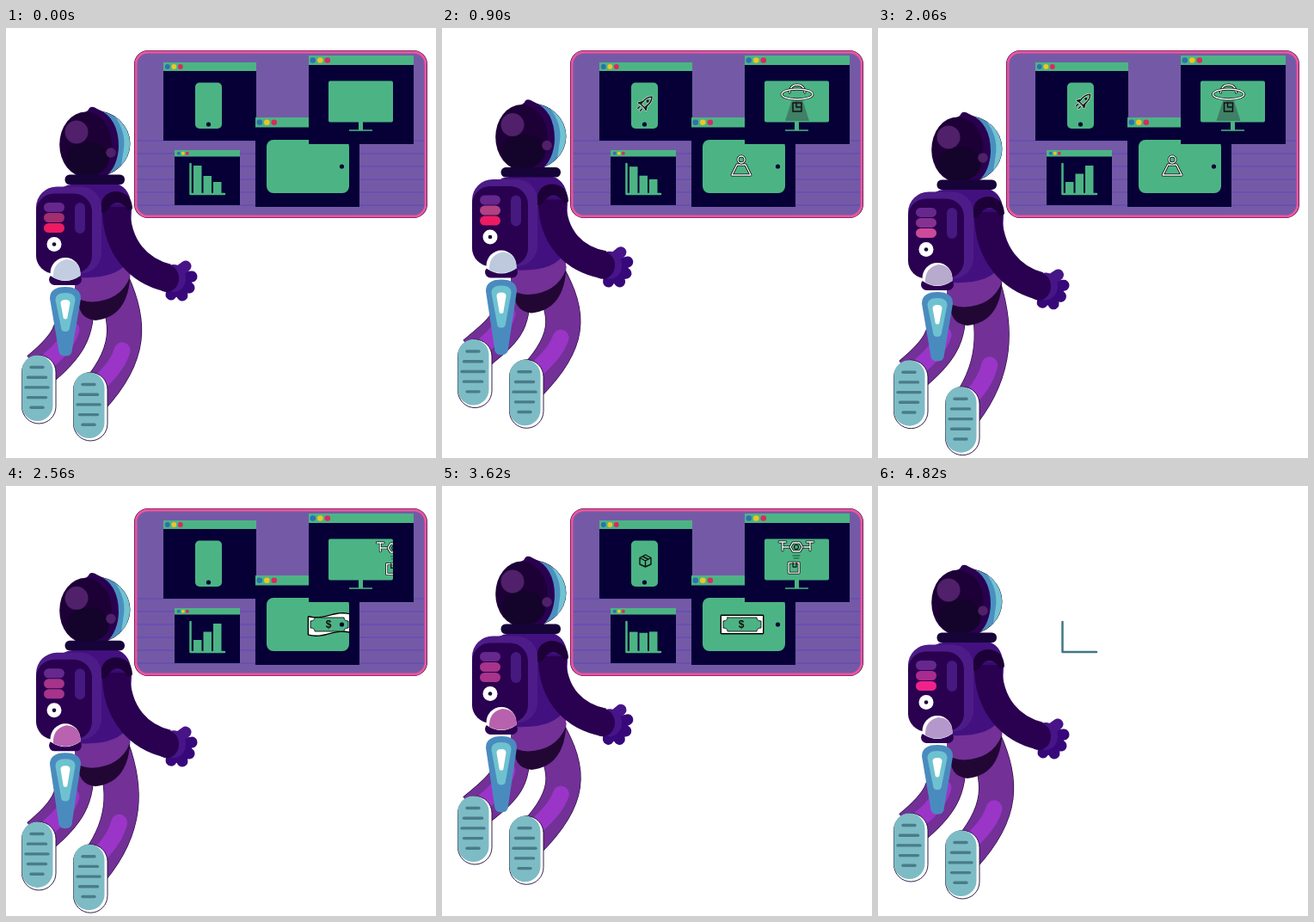
These frames come from a looping animation (500 by 500 pixels, 4.84 s). An HTML page with a canvas:

```html
<!DOCTYPE html>
<html>
<head>
<meta charset="utf-8">
<style>
  html, body { margin: 0; width: 100%; height: 100%; overflow: hidden; background: #fff; }
  canvas { display: block; }
</style>
</head>
<body>
<canvas id="stage" width="500" height="500"></canvas>
<script>
const ctx = document.getElementById('stage').getContext('2d');
const LOOP = 4840;
const GREEN = '#4cb484', NAVY = '#060036', DARK = '#2a0050', PURPLE = '#733097', EDGE = '#1d0733';
let t = 0;

// Motion helpers
const ease = p => (1 - Math.cos(Math.PI * Math.min(1, Math.max(0, p)))) / 2;
function key(times, values) {
  let i = 0;
  while (i < times.length - 2 && t > times[i + 1]) i++;
  const p = ease((t - times[i]) / (times[i + 1] - times[i]));
  return values[i] + (values[i + 1] - values[i]) * p;
}
const tint = (times, colors) =>
  `rgb(${[0, 1, 2].map(c => Math.round(key(times, colors.map(v => v[c])))).join()})`;
const slide = (start, end, width, inTime = 600) =>
  width * (1 - ease((t - start) / inTime) - ease((t - end) / 350));

// Drawing helpers
const shape = path => typeof path === 'string' ? new Path2D(path) : path;
function fill(path, color) {
  ctx.fillStyle = color;
  ctx.fill(shape(path));
}
function line(path, color, width) {
  ctx.strokeStyle = color;
  ctx.lineWidth = width;
  ctx.stroke(shape(path));
}
function box(x, y, w, h, r = 0) {
  const p = new Path2D();
  p.roundRect(x, y, w, h, r);
  return p;
}
function oval(x, y, rx, ry = rx) {
  const p = new Path2D();
  p.ellipse(x, y, rx, ry, 0, 0, 7);
  return p;
}
function at(x, y, draw, angle = 0) {
  ctx.save();
  ctx.translate(x, y);
  ctx.rotate(angle);
  draw();
  ctx.restore();
}
function inside(path, draw) {
  ctx.save();
  ctx.clip(path);
  draw();
  ctx.restore();
}
function outlined(path) {
  line(path, '#000', 2.8);
  line(path, '#fff', 1.4);
}

// Screen contents
function rocket() {
  const body = 'M0 -10 Q5 -5 3 5 H-3 Q-5 -5 0 -10Z M-3 1 L-6 6 L-3 5 M3 1 L6 6 L3 5 M-2 8 V11 M2 8 V11';
  line(body, '#fff', 2.4);
  line(body, '#111', 1.5);
  fill(oval(0, -3, 1.5), '#111');
}
function ufo() {
  fill('M-6 7 H6 L14 32 H-14Z', '#3f8066');
  outlined('M-9 -1 Q-8 -10 0 -10 Q8 -10 9 -1');
  outlined(oval(0, 1, 18, 6));
  line(box(-5, 11, 10, 10), '#111', 1.5);
  line('M-1 11 V16 H4', '#111', 1.4);
}
function pawn() {
  outlined('M-5 -2 H5 L11 10 H-11Z');
  outlined(oval(0, -8, 4));
}
function cube() {
  line('M0 -7 L6.5 -3.5 V4 L0 7 L-6.5 4 V-3.5Z M-6.5 -3.5 L0 0 L6.5 -3.5 M0 0 V7 M-3 -5 L3 -2', '#111', 1.4);
}
function drone() {
  for (const side of [-1, 1]) {
    const x = side * 16;
    outlined(`M${x - 4} -6 H${x + 4} M${x} -6 V4 M${x} 0 H${side * 7}`);
  }
  outlined('M-7 0 L-4 -5 H4 L7 0 L4 5 H-4Z');
  line(oval(0, 0, 2.5), '#111', 1.2);
  line('M-4 10 H4 M-3 13 H3', '#274', 1.3);
}
function parcel() {
  outlined(box(-6, -6, 12, 12));
  line('M-1 -6 V-1 H3 V-6', '#111', 1.2);
}
function banknote() {
  const amp = 2.5 * ease(Math.abs(t - 3620) / 600);
  const edge = y => Array.from({ length: 13 }, (_, i) => {
    const x = i * 4 - 24;
    return `${x} ${y - amp * Math.sin(x / 24 * Math.PI * .8)}`;
  });
  const paper = `M${[...edge(-10), ...edge(10).reverse()].join(' L')}Z`;
  const inner = 'M-17 -8 H17 Q17 -4 22 -4 V4 Q17 4 17 8 H-17 Q-17 4 -22 4 V-4 Q-17 -4 -17 -8Z';
  line(paper, '#000', 2.8);
  fill(paper, '#fff');
  fill(inner, GREEN);
  line(inner, '#111', .9);
  ctx.fillStyle = '#111';
  ctx.font = 'bold 12px Arial, "Liberation Sans", sans-serif';
  ctx.textAlign = 'center';
  ctx.textBaseline = 'middle';
  ctx.fillText('$', -1, .5);
}

function browser(x, y, w, h, bar, dotGap, r) {
  fill(box(x, y, w, h), NAVY);
  fill(box(x, y, w, bar), GREEN);
  ['#2e70b0', '#edc526', '#d92a5e'].forEach((c, i) =>
    fill(oval(x + 4.8 + i * dotGap, y + bar / 2, r), c));
}
const axes = color => line('M214.5 158 V193 H254', color, 2.5);

function chart() {
  axes(GREEN);
  const heights = [[160, 179], [172, 169.5], [179, 160]];
  heights.forEach(([a, b], i) => {
    const top = key([0, 740 - i * 70, 1740, 3150, 4100, LOOP], [a, a, b, b, a, a]);
    fill(box(218 + i * 11.5, top, 9.5, 192 - top), GREEN);
  });
}

function panel() {
  const board = box(151, 28, 337, 191, 14);
  line(board, EDGE, 4);
  fill(board, '#745aa6');
  for (let y = 131; y < 210; y += 15) fill(box(152, y - 1, 335, 2), '#6a4fb0');
  line(board, '#f0539f', 2.8);

  browser(183, 40, 108, 91, 10, 7.5, 2.9);
  const phone = box(220, 63.5, 31, 53.5, 5);
  fill(phone, GREEN);
  fill(oval(235.5, 112, 2.6), NAVY);
  inside(phone, () => {
    const fly = slide(150, 2000, 36);
    at(237 - fly, 87 + fly, rocket, Math.PI / 4);
    at(236.5 + slide(2550, 4430, 40, 500), 87, cube);
  });

  browser(196, 142, 76, 64, 7.5, 5, 2);
  chart();

  browser(290, 104, 121, 104, 11.5, 8.5, 3.3);
  const tablet = box(303, 130, 96, 62, 8);
  fill(tablet, GREEN);
  inside(tablet, () => {
    at(348 + slide(150, 2000, 80), 161, pawn);
    at(349 + slide(2190, 4430, 85), 161, banknote);
  });
  fill(oval(390.5, 161, 2.6), NAVY);

  browser(352, 32, 122, 103, 11, 8.5, 3.3);
  const screen = box(375, 61.5, 75, 48, 2);
  fill(screen, GREEN);
  fill('M410 109 H415 V118.3 H426 V119.8 H399 V118.3 H410Z', GREEN);
  inside(screen, () => {
    at(413 + slide(150, 2000, 75), 76, ufo);
    const x = slide(2260, 4430, 75), sway = 2 * Math.sin((t - 3970) / 223);
    at(414 + x + sway, 72 + sway / 2, drone);
    at(411.5 + x + sway * 1.2, 96.5 + sway * .7, parcel);
  });
}

// Astronaut
function leg(path, width, shine) {
  ctx.lineCap = 'butt';
  line(path, EDGE, width + 1.2);
  line(path, PURPLE, width);
  ctx.lineCap = 'round';
  line(shine, '#9a35c8', 19);
}
function foot(x, y) {
  const sole = box(x + .5, y + .5, 39.5, 79.5, 19.8);
  fill(sole, '#fff');
  line(sole, EDGE, .9);
  fill(box(x + .5, y + .5, 36, 76.5, 18), '#7dbcc5');
  [7, 10.5, 13, 10.5, 7].forEach((half, i) => {
    const ly = y + 14.5 + i * 11.7;
    line(`M${x + 18 - half} ${ly} H${x + 18 + half}`, '#497c8a', 3.4);
  });
}
function helmet() {
  const dome = oval(104, 134.5, 40, 38);
  line(dome, EDGE, 1);
  fill(dome, '#4a8fc0');
  inside(dome, () => fill('M122 97 Q140 118 137 140 L134 160 L150 150 V95Z', '#72c3d2'));
  fill('M92 98 Q96 96 97 93 Q100 90 106 94 Q131 104 131 138 Q130 160 117 172 H92Z', DARK);
  fill(oval(92.5, 135.5, 30.3, 38), '#1d0036');
  fill(oval(95, 152, 25, 20), '#14042b');
  fill(oval(82, 121, 13.5), '#50206a');
  fill(oval(122, 145, 5.8), '#50206a');
}
function flame() {
  const len = 84.5 - 4 * Math.cos(t / LOOP * 28 * Math.PI);
  const drop = (y, w, h, tip, color) =>
    fill(`M${69 - w} ${y + w * .75} Q${69 - w} ${y} 69 ${y} Q${69 + w} ${y} ${69 + w} ${y + w * .75}
      L${69 + tip} ${y + h - tip} Q${69 + tip} ${y + h} 69 ${y + h} Q${69 - tip} ${y + h} ${69 - tip} ${y + h - tip}Z`, color);
  drop(301, 18, len, 8, '#4a8bbf');
  drop(308, 11.5, len * .56, 5, '#6ec2d0');
  drop(316, 5.5, len * .28, 2.5, '#fff');
}
function backpack() {
  fill(box(35, 184.5, 76, 101, 24), '#4d1c88');
  fill(box(35, 192.5, 65, 93, 21), DARK);
  const times = [0, 900, 1640, 2560, 3620, 4320, LOOP];
  const magenta = [166, 52, 138], red = [235, 28, 98];
  const pills = [
    '#66288c',
    tint(times, [[160, 46, 112], [176, 66, 130], [107, 47, 148], magenta, magenta, [176, 64, 128], [168, 44, 144]]),
    tint(times, [red, red, [231, 90, 165], magenta, magenta, red, [240, 34, 138]])
  ];
  pills.forEach((c, i) => fill(box(44, 203 + i * 12, 24, 11, 5.5), c));
  fill(box(80, 203, 12, 36, 6), '#451980');
  fill(oval(56, 251.5, 8.5), '#fff');
  fill(oval(56, 251.5, 2.3), EDGE);
  fill(box(50, 286, 38, 13, 6.5), DARK);
  fill('M51.5 288 V285 A17.5 18 0 0 1 86.5 285 V288 Q69 300 51.5 288Z', '#fff');
  fill('M55 290 Q54 273 70 269 Q87 270 86.5 288 Q70 298 55 290Z',
    tint([0, 1900, 2350, 4350, LOOP], [[195, 205, 225], [182, 199, 217], [184, 98, 176], [184, 98, 172], [180, 152, 203]]));
}
function arm(h) {
  const y = 290 + h;
  at(195, y, () => {
    ctx.lineCap = 'round';
    line('M0 2 L21 -1 M0 2 L18 12 M0 2 L10 21 M0 2 L-3 20', '#370879', 13);
    fill(oval(5, 7, 16), '#370879');
    line('M0 -3 L14 -13', '#471587', 13);
    fill(oval(0, 1, 14, 16), '#471587');
  }, h * .012);
  ctx.lineCap = 'butt';
  line(`M128 208 C128 ${257 + h * .3} 156 ${283 + h * .8} 188 ${290.5 + h}`, DARK, 32.5);
  fill(oval(187, y + 1, 14, 16), DARK);
  fill('M110 214 Q109 191 128 190 Q146 191 147 210 Q142 216 139 208 Q128 197 119 210 Q115 216 110 214Z', '#1c0037');
}

function astronaut() {
  const quarter = LOOP / 4;
  const body = key([0, quarter, 2 * quarter, 3 * quarter, LOOP], [0, -10, 10, -10, 0]);
  const limbTimes = [0, 1050, 2310, 3520, 4740];
  const right = key(limbTimes, [0, -15.5, 20, -17, 0]);
  const left = key([0, 1100, 2420, 3630, 4740], [0, -20, 11, -20, 0]);
  const hand = key(limbTimes, [0, -16, 12, -16, 0]);

  const knee = (body - right) * .7;
  leg(`M123 ${295 + body} C${145 + knee} ${342 + body} ${146 + knee} ${380 + right} 100 ${430 + right}`, 40,
    `M${135 + knee * .7} ${375 + right} Q${130 + knee * .5} ${393 + right} 108 ${413 + right}`);
  leg(`M80 ${315 + body} C84 ${352 + body} 70 ${372 + left} 38 ${398 + left}`, 42,
    `M76 ${351 + left} Q70 ${370 + left} 50 ${386 + left}`);

  at(0, body, () => {
    fill('M84 310 Q82 338 104 340 Q143 336 144.5 285Z', '#220735');
    fill('M80 275 H144 V290 Q133 317 100 318.5 Q88 318 80 312Z', PURPLE);
    fill('M62 188 Q70 181 85 181 H128 Q146 186 146 212 L143 270 Q130 292 86 290Z', '#42117f');
    fill('M112 205 Q120 250 143 278 L144 240 L138 205Z', '#380b70');
    arm(hand - body);
    backpack();
    flame();
    helmet();
    fill(box(68.5, 170.5, 69.5, 11.5, 5.5), '#160338');
  });
  foot(18, 380 + left);
  foot(78, 400 + right);
}

function draw() {
  t = performance.now() % LOOP;
  ctx.fillStyle = '#fff';
  ctx.fillRect(0, 0, 500, 500);
  ctx.lineCap = ctx.lineJoin = 'round';
  if (t < LOOP - 20) panel();
  else axes('#3f7884');
  astronaut();
  requestAnimationFrame(draw);
}
draw();
</script>
</body>
</html>
```
